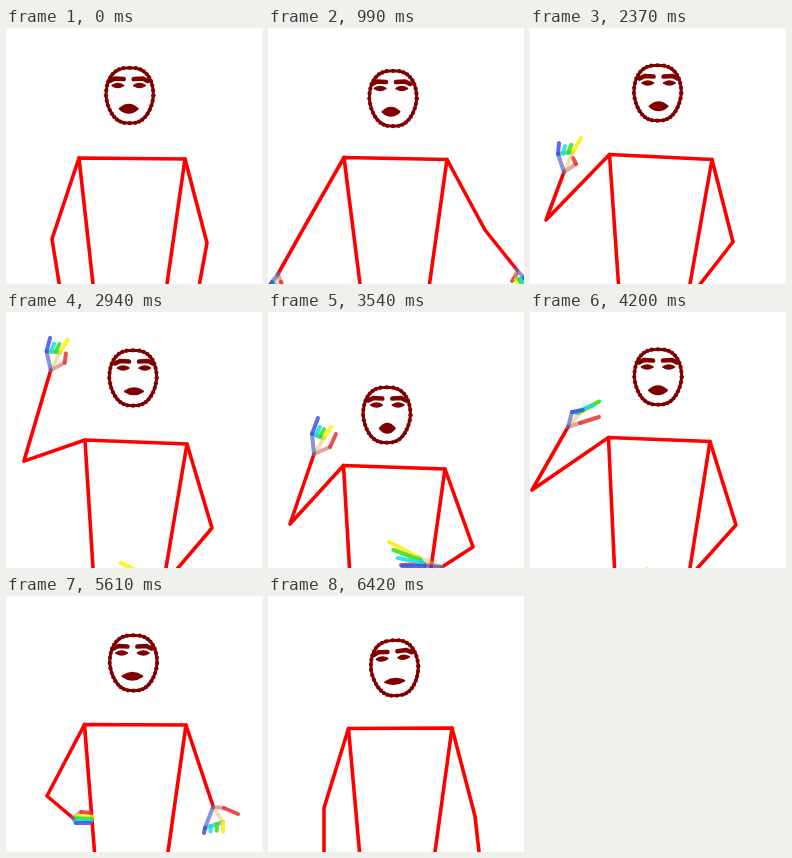
Recreate the animation shown at these times as an HTML page with a canvas. Size 256 px wide and 256 px high, loop 6450 ms.

```html
<!DOCTYPE html>
<html>
<head>
<meta charset="utf-8">
<style>
html, body { margin: 0; height: 100%; overflow: hidden; background: #fff; }
canvas { display: block; width: 100vw; height: 100vh; }
</style>
</head>
<body>
<canvas id="stage" width="256" height="256"></canvas>
<script>
const LOOP = 6450, STEP = 30;
const ctx = document.getElementById('stage').getContext('2d');
const FINGERS = ['#ffee00', '#30e020', '#10dfe0', '#4050f0'];

// Every track row starts with its time in ms.
// centre x, y, feature shift, tilt, mouth half width, mouth half height
const face = [
  [0, 123.7, 67.5, -1, 0, 10, 5],
  [450, 124, 65, 0, 0, 10, 4],
  [990, 125, 70.5, -2, 0, 9.5, 5],
  [1700, 127, 65, 0, 0, 10, 4],
  [2370, 127.6, 65, 1, 0, 10, 5],
  [2950, 127, 66, 1, 0, 10, 4],
  [3540, 118.8, 103, 0.5, 0, 8.5, 5.5],
  [3960, 127, 64, 0, 0, 10, 5],
  [4200, 128, 65, 0, 0, 10, 5],
  [5610, 127.4, 67, -1, 0, 11, 4.5],
  [6420, 126.7, 72, -1, -0.08, 10.5, 3.5]
];
// left shoulder, right shoulder, torso ends on the lower edge
const torso = [
  [0, 73, 130, 179, 131, 87, 161],
  [990, 76, 129.5, 179, 131.5, 92, 161.5],
  [2370, 79.5, 126.5, 182, 131.5, 88.5, 160],
  [2950, 79, 128, 181, 132, 87, 160],
  [3540, 75.5, 153.5, 177, 157, 81.5, 163],
  [3960, 78, 126, 180, 130, 84, 160],
  [4200, 78.5, 125.5, 180, 129.5, 84.5, 160],
  [5610, 78.5, 128.5, 180, 129, 88.5, 162],
  [6420, 80.5, 132.5, 184, 132, 91.5, 167]
];
// elbow, wrist
const leftArm = [
  [0, 46, 211, 60, 298],
  [600, 34, 196, 14, 228],
  [990, 38, 196, 10, 246],
  [1500, 8, 196, 26, 162],
  [2370, 16, 192, 34, 144],
  [3000, 18, 148, 45, 56],
  [3540, 22, 212, 46, 142],
  [4200, 2, 178, 38, 115],
  [4680, 31, 195, 62, 150],
  [5610, 41, 200, 67, 222],
  [5970, 38, 202, 20, 240],
  [6420, 56, 212, 56, 300]
];
const rightArm = [
  [0, 201, 215, 185, 302],
  [600, 203, 214, 193, 290],
  [990, 217, 202, 249, 242],
  [1380, 211, 208, 225, 254],
  [1700, 204, 213, 182, 285],
  [2370, 203, 214, 157, 273],
  [2950, 206, 216, 160, 270],
  [3540, 205, 235, 174, 255],
  [4200, 206, 213, 155, 270],
  [4680, 207, 212, 165, 270],
  [5310, 207, 211, 207, 224],
  [5610, 207, 210, 207, 211],
  [5970, 213, 206, 240, 240],
  [6420, 207, 220, 216, 300]
];
// offsets from the wrist: index base, little base, index tip, little tip,
// thumb joint, thumb tip; then the reach of the middle fingers
const leftHand = [
  [990, -2, 12, -6, 8, -6, 20, -12, 16, 3, 8, 5, 14, 1],
  [2370, 9, -20, -6, -18, 17, -34, -5, -29, 12, -8, 9, -14, 0.6],
  [3540, 10, -16, -2, -20, 17, -27, 4, -36, 16, -7, 22, -20, 0.6],
  [4200, 12, -14, 4, -15, 30, -25, 15, -17, 12, -4, 31, -10, 1.4],
  [5610, 4, -2, 3, 5, 20, -1, 17, 5, 8, -6, 18, -5, 1],
  [5970, -2, 12, -6, 8, -6, 20, -12, 16, 3, 8, 5, 14, 1]
];
const rightHand = [
  [990, -1, 10, 7, 8, 3, 16, 12, 14, -1, 5, -5, 11, 1],
  [3540, -24, -10, -17, -1, -53, -25, -40, -1, -18, -3, -41, -2, 1],
  [5610, 10, 15, -8, 21, 10, 25, -9, 26, 11, 1, 25, 7, 0.8],
  [5970, -1, 10, 7, 8, 3, 16, 12, 14, -1, 5, -5, 11, 1]
];

const mix = (a, b, k) => a + (b - a) * k;

function sample(track, t) {
  let i = track.findIndex(row => row[0] > t);
  if (i < 0) i = track.length;
  const a = track[Math.max(i - 1, 0)], b = track[Math.min(i, track.length - 1)];
  const p = a === b ? 0 : (t - a[0]) / (b[0] - a[0]);
  const k = p * p * (3 - 2 * p);
  return a.slice(1).map((v, n) => mix(v, b[n + 1], k));
}

function line(color, width, alpha, ...p) {
  ctx.strokeStyle = color;
  ctx.lineWidth = width;
  ctx.globalAlpha = alpha;
  ctx.beginPath();
  for (let i = 0; i < p.length; i += 2) ctx.lineTo(p[i], p[i + 1]);
  ctx.stroke();
  ctx.globalAlpha = 1;
}

function lens(x, y, w, h) {
  ctx.beginPath();
  ctx.moveTo(x - w, y);
  ctx.quadraticCurveTo(x, y - 2 * h, x + w, y);
  ctx.quadraticCurveTo(x, y + 2 * h, x - w, y);
  ctx.fill();
  ctx.stroke();
}

function drawFace([x, y, shift, tilt, mouthW, mouthH]) {
  const color = '#800000';
  ctx.save();
  ctx.translate(x, y);
  ctx.rotate(tilt);
  ctx.fillStyle = color;
  const outline = [];
  for (let i = 0; i <= 36; i++) {
    const a = i / 36 * 2 * Math.PI, c = Math.cos(a), s = Math.sin(a);
    const px = 23.7 * Math.sign(c) * Math.abs(c) ** 0.75 * (1 - 0.12 * Math.max(0, s));
    const py = 27.7 * Math.sign(s) * Math.abs(s) ** 0.95;
    outline.push(px, py);
    ctx.beginPath();
    ctx.arc(px, py, 2.1, 0, 7);
    ctx.fill();
  }
  line(color, 3, 1, ...outline);
  ctx.translate(shift, 0);
  for (const side of [-1, 1]) {
    line(color, 4.6, 1, side * 19, -14.5, side * 14, -17, side * 5, -16.5);
    ctx.lineWidth = 2;
    lens(side * 10.8, -10, 5.5, 1.8);
  }
  lens(0, 13.3, mouthW - 1, mouthH - 1);
  ctx.restore();
}

function drawHand(x, y, h) {
  const [ix, iy, lx, ly, ax, ay, bx, by, jx, jy, tx, ty, reach] = h;
  ctx.save();
  ctx.translate(x, y);
  line('#d04040', 4, 0.5, 0, 0, jx, jy);
  line('#e83030', 4, 0.85, jx, jy, tx, ty);
  line('#d8c040', 4, 0.45, 0, 0, ix, iy);
  line('#4048c8', 4, 0.6, 0, 0, lx, ly);
  line('#30a090', 4, 0.6, ix, iy, lx, ly);
  FINGERS.forEach((color, i) => {
    const k = i / 3, r = i % 3 ? reach : 1;
    const px = mix(ix, lx, k), py = mix(iy, ly, k);
    line(color, 4, 0.85, px, py, mix(px, mix(ax, bx, k), r), mix(py, mix(ay, by, k), r));
  });
  ctx.restore();
}

function draw(t) {
  ctx.fillStyle = '#fff';
  ctx.fillRect(0, 0, 256, 256);
  ctx.lineCap = ctx.lineJoin = 'round';
  const [lx, ly, rx, ry, hl, hr] = sample(torso, t);
  const left = sample(leftArm, t), right = sample(rightArm, t);
  const red = (...p) => line('#ff0000', 3.6, 1, ...p);
  red(hl, 256, lx, ly, rx, ry, hr, 256);
  red(lx, ly, ...left);
  red(rx, ry, ...right);
  drawHand(left[2], left[3], sample(leftHand, t));
  drawHand(right[2], right[3], sample(rightHand, t));
  drawFace(sample(face, t));
}

function tick() {
  const t = performance.now() % LOOP;
  draw(t < 60 ? 0 : Math.floor(t / STEP) * STEP);
  requestAnimationFrame(tick);
}
tick();
</script>
</body>
</html>
```
